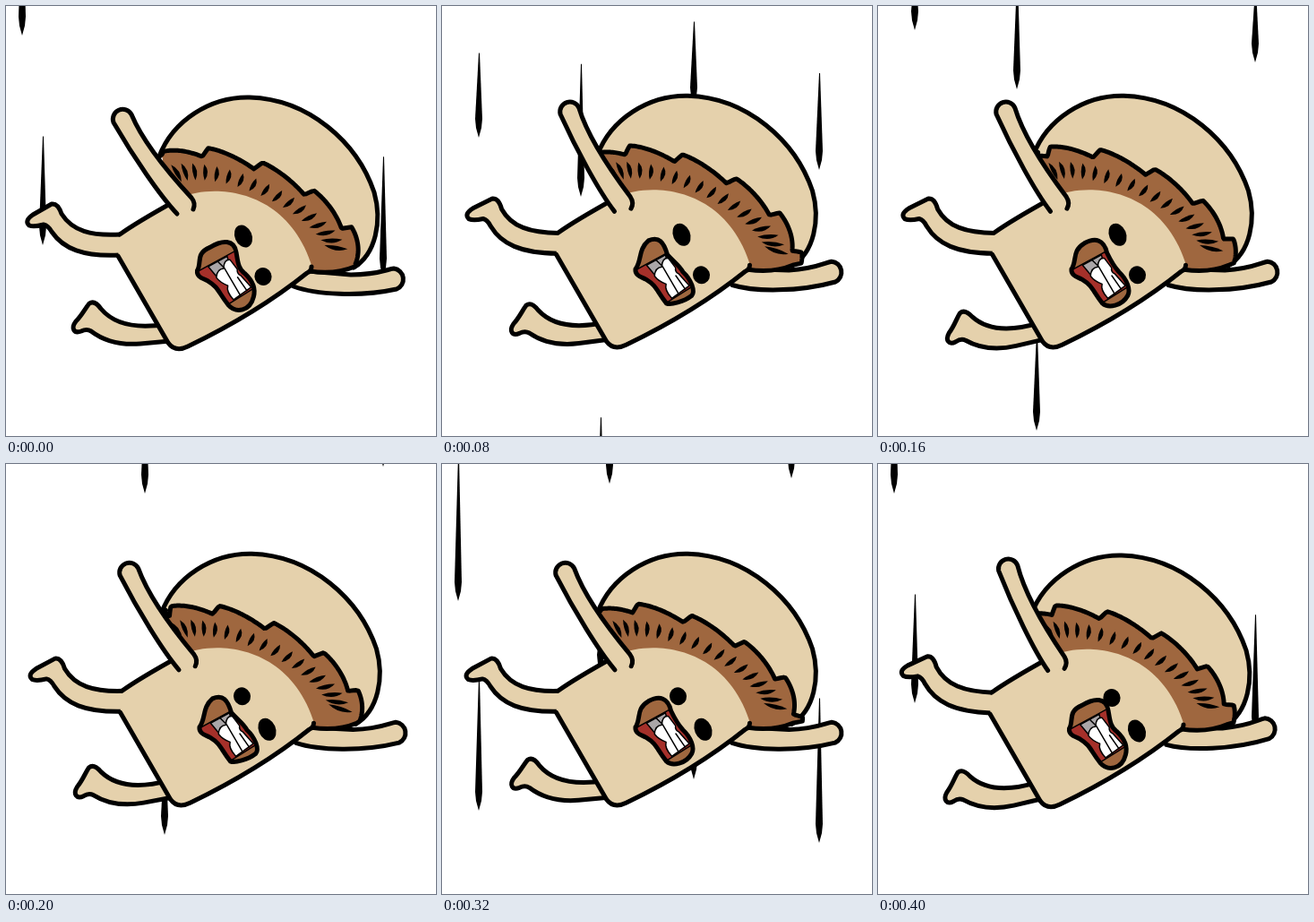
These frames come from a looping animation (480 px wide and 480 px high, 0.44 s). An HTML page with a canvas:

```html
<!DOCTYPE html>
<html lang="en">
<head>
<meta charset="utf-8">
<title>Falling mushroom</title>
<style>
  html, body { margin: 0; height: 100%; overflow: hidden; background: #fff; }
  canvas { display: block; width: 480px; height: 480px; }
</style>
</head>
<body>
<canvas id="stage" width="480" height="480"></canvas>
<script>
const ctx = document.getElementById('stage').getContext('2d');
const CREAM = '#e5d1ac', BROWN = '#9f673f', RED = '#a5302a', GRAY = '#aaa6a8';
const STEP = 40, STEPS = 11;

const path = d => new Path2D(d);
const CAP = path('M176 165L171 168C186 128 228 101 272 102C338 104 392 152 411 208C420 240 413 277 388 292');
const BODY = path('M127 255Q145 242 195 214C232 198 315 203 342 292L338 297Q280 343 203 380Q190 387 181 376L125 279Z');
const BODY_EDGE = path('M127 255Q145 242 190 217M125 279L181 376Q189 387 203 380Q280 343 336 298Q341 296 341 291');
const LEFT_ARM = path('M191 232C172 212 142 168 120 130A11 11 0 0 1 140 121C150 145 170 174 207 214Q212 220 209 227');
const RIGHT_ARM = path('M321 313C345 322 395 325 436 316A12 12 0 0 0 433 293C425 294 415 300 385 300L338 296');
const UPPER_LEG = path('M128 255C95 257 74 251 62 232Q58 220 51 221L30 233Q20 240 26 245Q31 247 42 244Q47 245 51 252C64 271 86 280 127 278');
const LOWER_LEG = path('M180 355C150 360 122 357 106 338Q99 328 93 332C88 338 85 345 78 352C72 360 76 366 84 363Q90 360 95 363C108 373 125 379 150 377L183 374');

// Streaks: x, step of birth, tip height at birth
const STREAKS = [[18, 7, 212], [41, 6, 506], [155, 0, 332], [177, 9, 773],
  [187, 7, 81], [281, 6, 471], [390, 6, 135], [421, 7, 482]];

function draw(shape, fill, width = 5) {
  if (fill) { ctx.fillStyle = fill; ctx.fill(shape); }
  if (width) { ctx.lineWidth = width; ctx.stroke(shape); }
}

function limb(shape, x, y, angle) {
  ctx.save();
  ctx.translate(x, y);
  ctx.rotate(angle);
  ctx.translate(-x, -y);
  draw(shape, CREAM);
  ctx.restore();
}

// Point on the rim of the gills, u scallops from the left, moved inward by depth
function rim(u, depth) {
  const t = u / 5, s = 1 - t;
  const point = (a, b, c, d) => s * s * s * a + 3 * s * s * t * b + 3 * s * t * t * c + t * t * t * d;
  const slope = (a, b, c, d) => s * s * (b - a) + 2 * s * t * (c - b) + t * t * (d - c);
  const xs = [174, 246, 406, 400], ys = [163, 136, 216, 292];
  const normal = Math.atan2(slope(...xs), -slope(...ys));
  return [point(...xs) + depth * Math.cos(normal), point(...ys) + depth * Math.sin(normal), normal];
}

function gills(roll) {
  const edge = new Path2D('M174 166');
  for (let u = 0.04; u < 4.95; u += 0.03) {
    const f = (u + roll) % 1;
    edge.lineTo(...rim(u, f < 0.9 ? 10 * (f / 0.9) ** 1.5 : 100 * (1 - f)).slice(0, 2));
  }
  edge.lineTo(389, 291);
  edge.quadraticCurveTo(368, 300, 339, 296);
  const area = new Path2D(edge);
  area.lineTo(270, 240);
  area.lineTo(195, 215);
  area.lineTo(178, 192);
  draw(area, BROWN, 0);
  draw(edge);

  ctx.fillStyle = '#000';
  for (let u = 0.25 * (1 - roll * 4 % 1); u < 4.5; u += 0.25) {
    const [x, y, normal] = rim(u, 27);
    const half = 8 + (u - 2) ** 2;
    ctx.save();
    ctx.translate(x, y);
    ctx.rotate(normal + 0.5 * (u / 2 - 1));
    ctx.beginPath();
    ctx.moveTo(-half, 0);
    ctx.quadraticCurveTo(0, -6, half, 2);
    ctx.quadraticCurveTo(0, 4, -half, 0);
    ctx.fill();
    ctx.restore();
  }
}

function rain(step) {
  ctx.fillStyle = '#000';
  for (const [x, birth, start] of STREAKS) {
    const age = (step - birth + 10) % 10;
    const tip = start - 60 * age;
    const length = age ? 174 - 13.4 * age : 34;
    const wide = age ? 20 : 8;
    ctx.fill(path(`M${x} ${tip - length}l1 0L${x + 4} ${tip - wide}l-1 ${wide / 2}L${x} ${tip + 1}
      L${x - 3} ${tip - wide / 2}l-1 ${-wide / 2}Z`));
  }
}

function eye(x, y, ry) {
  ctx.fillStyle = '#000';
  ctx.beginPath();
  ctx.ellipse(x, y, 9.5, ry, -0.4, 0, 7);
  ctx.fill();
}

// squeeze 0: wide open, 1: narrow upper lip
function mouth(squeeze) {
  const q = squeeze;
  const lips = path(`M-25 -20C${-16 + 2 * q} -25 ${-18 + 6 * q} -38 ${3 * q} ${-36 - 5 * q}
    C16 ${-37 - 3 * q} ${28 - 11 * q} -31 ${23 - 9 * q} -17C${20 - 4 * q} -8 ${16 + 4 * q} 0 20 8
    C24 20 22 ${30 + 4 * q} 16 36C5 ${48 - 10 * q} -10 ${43 - 9 * q} -13 30
    C-16 12 -13 8 -20 -4C-24 -10 -29 -14 -25 -20Z`);
  ctx.save();
  ctx.translate(245, 301);
  ctx.rotate(-0.5);
  draw(lips, RED, 0);
  ctx.save();
  ctx.clip(lips);
  draw(path('M-30 -19H30V-50H-30Z'), BROWN, 1.5);
  draw(path('M-20 30L30 27V50H-20Z'), BROWN, 1.5);
  draw(path('M-12 -18H12L9 -6L-9 -3Z'), GRAY, 1.5);
  draw(path('M-10 -3Q-5 -11 2 -8Q7 -17 13 -13L15 0Q12 4 15 8L19 25L-5 28Q-8 16 -3 11Q-9 4 -10 -3Z'), '#fff', 1.5);
  draw(path('M0 -18L3 -8L4 28M11 8L13 26'), null, 1.5);
  ctx.restore();
  draw(lips);
  ctx.restore();
}

function render(step) {
  // The figure moves at nine tenths of the rain's rate, in a six-beat wobble
  const beat = Math.round(step * 0.9 + 0.04) % 6;
  const swing = 1 - Math.abs(1 - beat / 3);
  const kick = Math.min(1, Math.max(0, 0.5 - 0.75 * Math.cos((beat - 0.75) * Math.PI / 3)));
  const lift = Math.min(1, beat % 3);
  const blink = beat % 2;

  ctx.fillStyle = '#fff';
  ctx.fillRect(0, 0, 480, 480);
  ctx.lineCap = ctx.lineJoin = 'round';
  rain(step);

  ctx.save();
  ctx.translate(2.5 * lift, -1.7 * lift);
  draw(CAP, CREAM);
  limb(RIGHT_ARM, 325, 303, -0.085 * swing);
  limb(UPPER_LEG, 127, 267, 0.085 * swing);
  limb(LOWER_LEG, 180, 367, -0.14 * kick);
  gills(beat / 6);
  draw(BODY, CREAM, 0);
  draw(BODY_EDGE);
  limb(LEFT_ARM, 200, 222, 0.15 * swing);
  eye(265 - 4 * blink, 257 + 4 * blink, 13 - 3 * blink);
  eye(287 + 2 * blink, 302 - 4 * blink, 10 + 3 * blink);
  mouth(beat % 3 / 2);
  ctx.restore();
}

function tick() {
  render(Math.floor(performance.now() / STEP) % STEPS);
  requestAnimationFrame(tick);
}
tick();
</script>
</body>
</html>
```
